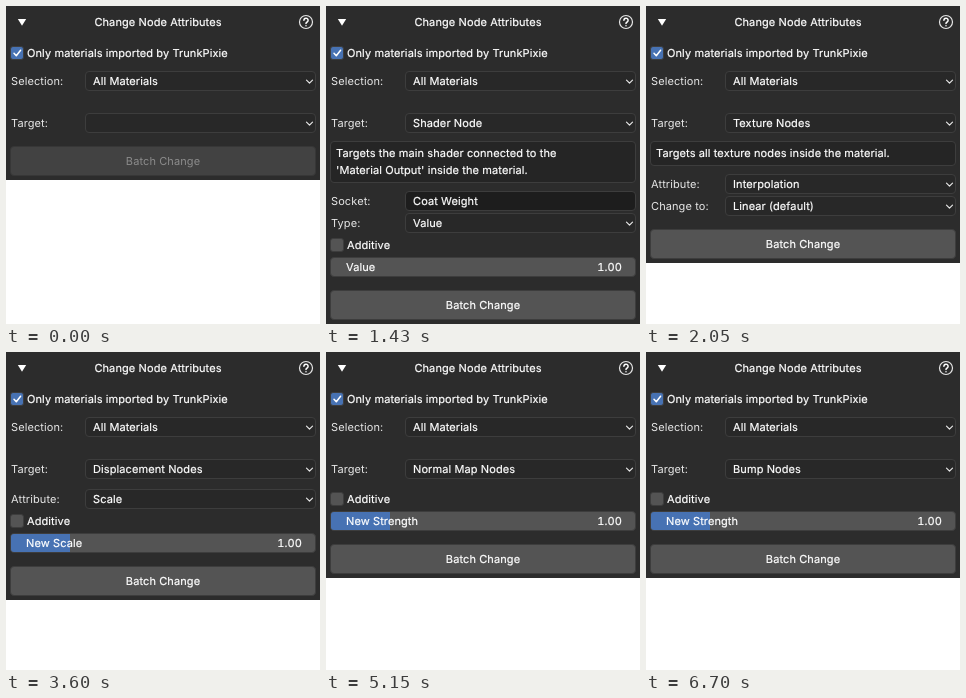
An HTML page for the animation above (8 s loop, 314 px wide and 318 px high).

```html
<!DOCTYPE html>
<html lang="en">
<head>
<meta charset="utf-8">
<title>Change Node Attributes</title>
<style>
  html, body { margin: 0; width: 100%; height: 100%; overflow: hidden; background: #fff; }
  svg { display: block; }
  text { font: 11px Inter, sans-serif; letter-spacing: .1px; fill: #e6e6e6; text-rendering: geometricPrecision; white-space: pre; }
  .bright { fill: #fff; stroke: #fff; stroke-width: .2; }
  .mid { text-anchor: middle; }
  .end { text-anchor: end; font-variant-numeric: tabular-nums; }
  .menu { fill: #282828; stroke: #3d3d3d; }
  .field { fill: #1d1d1d; stroke: #3d3d3d; }
  .box { fill: #252525; stroke: #3d3d3d; }
  .button { fill: #545454; stroke: #3d3d3d; }
  .on { fill: #4772b3; stroke: #3d3d3d; }
  .off .button { fill: #424242; stroke: #373737; }
  .off text { fill: #8b8b8b; }
  .fill { fill: #4772b3; }
  .line { fill: none; stroke: #e6e6e6; stroke-width: 1.2; stroke-linecap: round; stroke-linejoin: round; }
  .bold { stroke: #fff; stroke-width: 1.5; }
  /* The panel states sit side by side; the strip jumps from one to the next. */
  #strip { animation: states 8s step-end infinite; }
  @keyframes states {
    0% { transform: translateX(0); }
    6.25% { transform: translateX(-314px); }
    25.625% { transform: translateX(-628px); }
    45% { transform: translateX(-942px); }
    64.375% { transform: translateX(-1256px); }
    83.75%, 100% { transform: translateX(-1570px); }
  }
</style>
</head>
<body>
<svg width="314" height="318" viewBox="0 0 314 318">
  <defs>
    <clipPath id="filled"><rect x="4" y="-10" width="60" height="20"/></clipPath>
  </defs>
  <g id="strip"></g>
  <g id="head"></g>
</svg>
<script>
  const WIDTH = 314;

  // Every row is placed by the y of its centre line.
  const text = (x, y, s, cls = '') => `<text x="${x}" y="${y + 4}" class="${cls}">${s}</text>`;
  const rect = (cls, x, y, w, h, r = 3.5) =>
    `<rect class="${cls}" x="${x + .5}" y="${y + .5}" width="${w - 1}" height="${h - 1}" rx="${r}"/>`;

  const entry = (cls, y, label, value) =>
    text(5, y, label) + rect(cls, 79, y - 10, 231, 20) + text(87, y, value, 'bright');
  const field = (y, label, value) => entry('field', y, label, value);
  const menu = (y, label, value) => entry('menu', y, label, value) +
    `<path class="line" d="M300.5 ${y - .8}l3 3 3-3"/>`;
  const note = (y, lines) => rect('box', 4, y - 12, 306, 25 + 17 * (lines.length - 1)) +
    lines.map((s, i) => text(10, y + 17 * i, s, 'bright')).join('');
  const check = (y, label, on) => rect(on ? 'on' : 'button', 4, y - 7, 14, 14, 2.5) +
    (on ? `<path class="line bold" d="M8 ${y + .3}l2.3 2.5 4.3-5.6"/>` : '') +
    text(21, y, label, 'bright');
  const slider = (y, label, part) => rect('button', 4, y - 10, 306, 20) +
    (part ? `<g transform="translate(0 ${y})"><rect class="fill" x="5" y="-9" width="304" height="18" rx="3" clip-path="url(#filled)"/></g>` : '') +
    text(20, y, label, 'bright') + text(296, y, '1.00', 'bright end');
  const button = (y, off) => `<g class="${off ? 'off' : ''}">` +
    rect('button', 4, y - 15, 306, 30) + text(157, y, 'Batch Change', off ? 'mid' : 'bright mid') + '</g>';

  const panel = (buttonY, target, rows, off) =>
    `<rect width="${WIDTH}" height="${buttonY + 19}" fill="#2c2c2c"/>` +
    menu(117, 'Target:', target) + rows + button(buttonY, off);
  const strength = check(147, 'Additive') + slider(169, 'New Strength', true);

  const states = [
    panel(155, '', '', true),
    panel(299, 'Shader Node',
      note(147, ['Targets the main shader connected to the', "'Material Output' inside the material."]) +
      field(195, 'Socket:', 'Coat Weight') + menu(217, 'Type:', 'Value') +
      check(239, 'Additive') + slider(261, 'Value')),
    panel(238, 'Texture Nodes',
      note(147, ['Targets all texture nodes inside the material.']) +
      menu(178, 'Attribute:', 'Interpolation') + menu(200, 'Change to:', 'Linear (default)')),
    panel(229, 'Displacement Nodes',
      menu(147, 'Attribute:', 'Scale') + check(169, 'Additive') + slider(191, 'New Scale', true)),
    panel(207, 'Normal Map Nodes', strength),
    panel(207, 'Bump Nodes', strength)
  ];

  document.getElementById('strip').innerHTML =
    states.map((s, i) => `<g transform="translate(${i * WIDTH} 0)">${s}</g>`).join('');
  document.getElementById('head').innerHTML =
    '<path d="M11.8 13h8.4l-4.2 6.8z" fill="#fff"/>' +
    text(152, 16, 'Change Node Attributes', 'bright mid') +
    '<circle class="line" cx="300" cy="16" r="6.5"/>' +
    '<path class="line bold" d="M297.9 14.3a2.1 2.1 0 1 1 3.3 1.7q-1.2.7-1.2 1.6M300 19.7v.1"/>' +
    check(47, 'Only materials imported by TrunkPixie', true) +
    menu(75, 'Selection:', 'All Materials');
</script>
</body>
</html>
```
